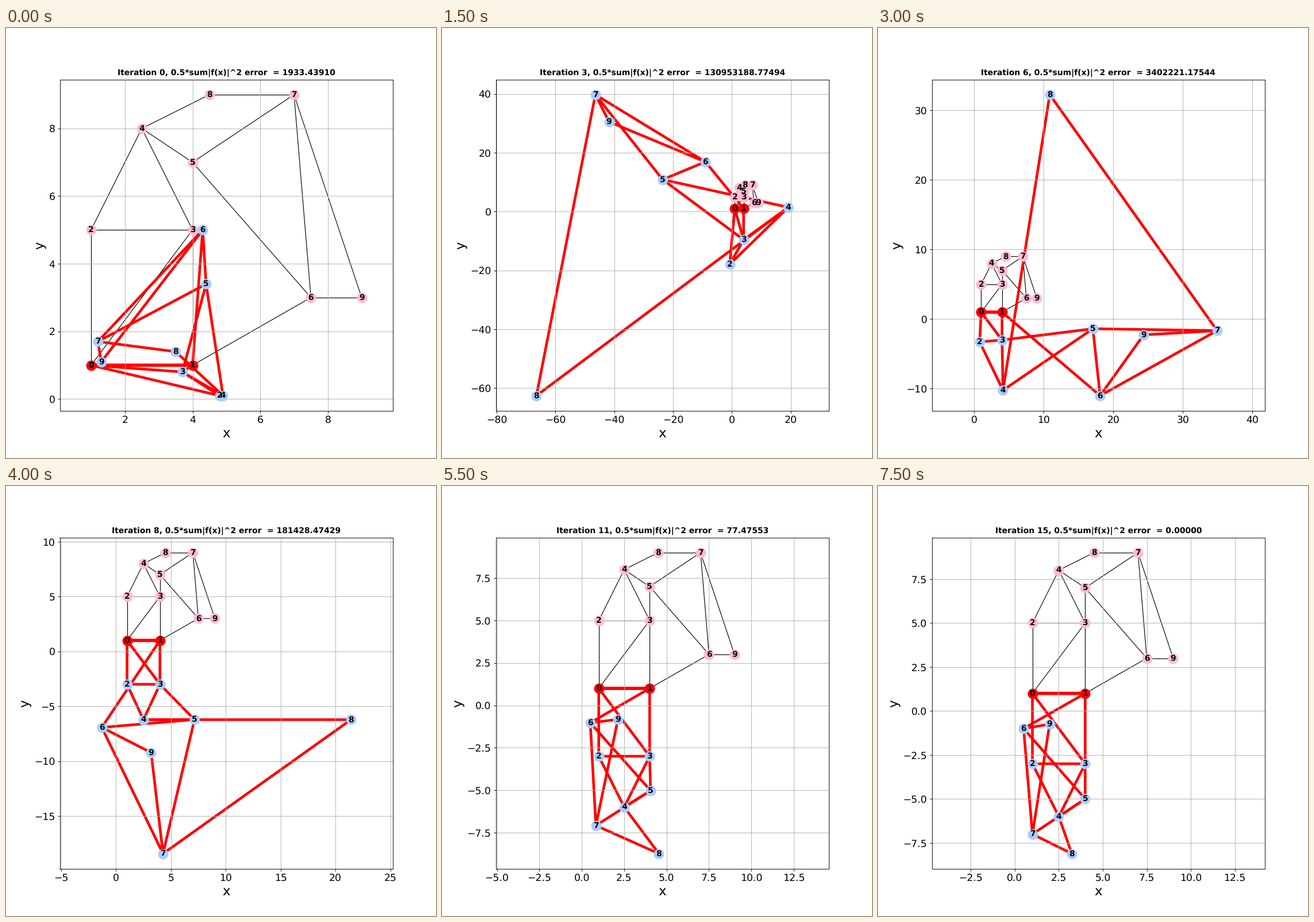
A matplotlib script that plays this animation: 748x748 px, repeating every 8 s.

```python
import numpy as np
import matplotlib.pyplot as plt
from matplotlib.animation import FuncAnimation
from matplotlib.collections import LineCollection

plt.rcParams.update({"font.family": "DejaVu Sans", "text.hinting": "none"})

SIZE, INCHES = 748, 9
STEPS, INTERVAL = 16, 500
PINK, BLUE, RED = "#ffbad2", "#aaccff", "#ff0000"

# Key points: the true layout, then the first guess for its movable nodes.
TRUE = np.array([(1, 1), (4, 1), (1, 5), (4, 5), (2.5, 8),
                 (4, 7), (7.5, 3), (7, 9), (4.5, 9), (9, 3)])
GUESS = [(4.8, 0.1), (3.7, 0.8), (4.9, 0.1), (4.4, 3.4),
         (4.3, 5), (1.2, 1.7), (3.5, 1.4), (1.3, 1.1)]
FIXED = len(TRUE) - len(GUESS)

# Every movable node hangs on two others: node, first support, second support.
TRIANGLES = "301 203 423 534 615 756 847 967".split()
EDGES = np.array([(int(node), int(support))
                  for node, *supports in TRIANGLES for support in supports])


def spans(points):
    return points[EDGES[:, 0]] - points[EDGES[:, 1]]


def residual(points):
    return (spans(points) ** 2 - spans(TRUE) ** 2).sum(axis=1)


def newton_step(points):
    rows = np.arange(len(EDGES))
    jacobian = np.zeros((len(EDGES), len(points), 2))
    jacobian[rows, EDGES[:, 0]] = 2 * spans(points)
    jacobian[rows, EDGES[:, 1]] = -2 * spans(points)
    square = jacobian[:, FIXED:].reshape(len(EDGES), -1)
    moved = points.copy()
    moved[FIXED:] -= np.linalg.solve(square, residual(points)).reshape(-1, 2)
    return moved


states = [np.vstack([TRUE[:FIXED], GUESS])]
while len(states) < STEPS:
    states.append(newton_step(states[-1]))

fig, ax = plt.subplots(figsize=(INCHES, INCHES), dpi=SIZE / INCHES,
                       facecolor="white")


def draw_edges(points, edges, color, width, snap=None):
    ax.add_collection(LineCollection(points[edges], colors=color, snap=snap,
                                     linewidths=width, zorder=1))


def draw_nodes(points, color, first, last):
    part = points[first:last]
    ax.scatter(*part.T, s=200, c=color, linewidths=1.5, zorder=2)
    for number, (x, y) in enumerate(part, first):
        ax.text(x, y, str(number), size=12, weight="bold",
                ha="center", va="center", clip_on=True)


def update(step):
    points = states[step]
    ax.clear()
    draw_edges(TRUE, EDGES, "black", 1)
    draw_nodes(TRUE, PINK, FIXED, len(TRUE))
    draw_edges(points, EDGES, RED, 4, snap=False)
    draw_edges(points, np.array([(0, 1)]), RED, 5, snap=False)
    draw_nodes(points, BLUE, FIXED, len(points))
    draw_nodes(points, RED, 0, FIXED)

    error = 0.5 * (residual(points) ** 2).sum()
    ax.set_title(f"Iteration {step}, 0.5*sum|f(x)|^2 error  = {error:.5f}",
                 size=12, weight="bold")
    ax.set_xlabel("x", size=20)
    ax.set_ylabel("y", size=20)
    ax.tick_params(labelsize=15)
    ax.grid(True)
    ax.axis("equal")
    return []


anim = FuncAnimation(fig, update, frames=STEPS, interval=INTERVAL,
                     repeat=True, repeat_delay=0, init_func=lambda: update(0))
plt.show()
```
